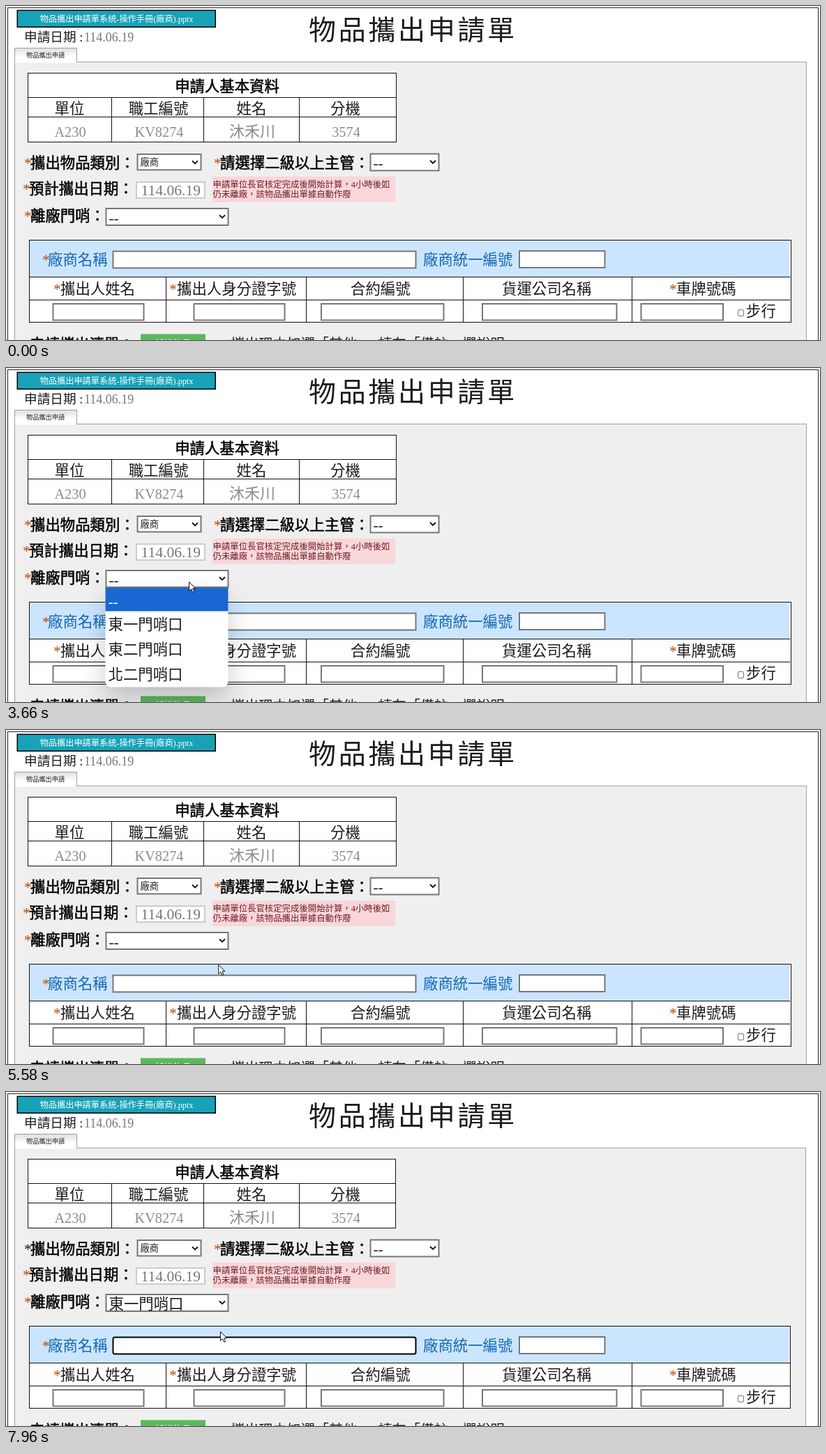
An HTML page that plays this animation: 1167 by 480 pixels, repeating every 8000 ms.

```html
<!DOCTYPE html>
<html lang="zh-Hant">
<head>
<meta charset="utf-8">
<style>
html, body { margin: 0; width: 100%; height: 100%; overflow: hidden; background: #fff; }
svg { display: block; width: 1167px; height: 480px; }
text { font-family: "Liberation Serif", "Noto Sans CJK TC", "Noto Sans CJK", serif; font-weight: 300; fill: #1c1c1c; white-space: pre; }
.regular { font-weight: 400; }
.bold { font-weight: 500; fill: #000; stroke: #000; stroke-width: .5px; }
.title { font-weight: 300; letter-spacing: 3.7px; }
.popup { filter: drop-shadow(0 18px 18px rgba(0, 0, 0, .2)); }
</style>
</head>
<body>
<svg id="stage" viewBox="0 0 1167 480">
  <defs>
    <linearGradient id="tab" x2="0" y2="1"><stop stop-color="#dedede"/><stop offset=".6" stop-color="#fff"/></linearGradient>
  </defs>
</svg>
<script>
const stage = document.getElementById('stage');
const LOOP = 8000, EM = 21.4, FIRST_ROW = 33.5, ROW = 36;

function add(tag, attrs, parent = stage) {
  const el = document.createElementNS('http://www.w3.org/2000/svg', tag);
  for (const key in attrs) el.setAttribute(key, attrs[key]);
  return parent.appendChild(el);
}

// y is the optical middle of the line
function text(x, y, content, size = EM, { fill, ...attrs } = {}, parent = stage) {
  const el = add('text', { x, y: y + size * .37, 'font-size': size, ...attrs }, parent);
  if (fill) el.style.fill = fill;
  el.textContent = content;
  return el;
}

const BOLD = { class: 'bold' };
const REGULAR = { class: 'regular' };
const MIDDLE = { 'text-anchor': 'middle' };

const rect = (x, y, width, height, fill, attrs) => add('rect', { x, y, width, height, fill, ...attrs });
const line = d => add('path', { d, stroke: '#111', fill: 'none' });
const star = (x, y) => text(x, y, '*', EM, { ...REGULAR, fill: '#b84600' });
const field = (x, y, w, h, stroke = '#767676') =>
  rect(x + 1, y + 1, w - 2, h - 2, '#fff', { stroke, 'stroke-width': 2 });

function label(x, y, content) {
  text(x + 9, y, content, EM, BOLD);
  return star(x, y);
}

function select(x, y, w, h, content, size) {
  const box = field(x, y, w, h);
  add('path', { d: `M${x + w - 13.5} ${y + 10.5}l4 4 4-4`, stroke: '#111', 'stroke-width': 1.8, fill: 'none' });
  return { box, value: text(x + 5, y + h / 2 + (size ? 0 : 1), content, size, REGULAR) };
}

// Page frame, header and tab
const frame = rect(2.5, 2.5, 1162, 500, '#fff', { stroke: '#222' });
const panel = rect(12.5, 80.5, 1135, 420, '#efefef', { stroke: '#a0a0a0' });
rect(16.25, 6.25, 284, 24, '#17a2b8', { stroke: '#000', 'stroke-width': 1.5 });
text(158.5, 18, '物品攜出申請單系統-操作手冊(廠商).pptx', 12.2, { style: 'font-weight:500', ...MIDDLE, fill: '#fff' });
text(26, 44, '申請日期 :', 18.67);
text(112, 44.5, '114.06.19', 18, { fill: '#777' });
text(434, 34, '物品攜出申請單', 39, { class: 'title' });
add('path', { d: 'M12.5 81.5V60.5H101.5V81.5', fill: 'url(#tab)', stroke: '#a0a0a0' });
text(29, 70.5, '物品攜出申請', 9.2, REGULAR);

// Applicant table
const applicant = rect(31.5, 96.5, 528, 99, '#fff', { stroke: '#111' });
line('M31 131.5H559M31 159.5H559M151.5 131V196M283.5 131V196M420.5 131V196');
text(317, 115, '申請人基本資料', EM, { ...BOLD, ...MIDDLE });
[[91, '單位', 'A230'], [218.5, '職工編號', 'KV8274'], [352, '姓名', '沐禾川'], [486.5, '分機', '3574']]
  .forEach(([x, head, value], i) => {
    text(x, 147, head, EM, MIDDLE);
    text(x + 1, 180, value, i === 2 ? 22 : 20.3, { ...MIDDLE, fill: '#8c8c8c' });
  });

// Form rows
const firstStar = label(26, 225, '攜出物品類別：');
select(187.5, 212, 93, 24.5, '廠商', 13.3);
label(298, 225, '請選擇二級以上主管：');
const manager = select(521.5, 211.5, 100, 26, '--');
label(24, 262.5, '預計攜出日期：');
field(186, 252, 100, 25, '#ccc');
text(193.5, 264.5, '114.06.19', 21.6, { fill: '#777' });
rect(296, 245, 262, 37, '#f8d7da');
text(296.5, 256.5, '申請單位長官核定完成後開始計算，4小時後如', 12.4, { fill: '#721c24' });
text(296.5, 270, '仍未離廠，該物品攜出單據自動作廢', 12.4, { fill: '#721c24' });
label(26, 301.5, '離廠門哨：');
const gate = select(142.5, 290, 177, 26, '--');

// Vendor table
const vendor = rect(33.5, 336.5, 1092, 118, '#fff', { stroke: '#111' });
rect(34, 337, 1089, 52, '#cce5ff');
line('M33 389.5H1124M33 422.5H1124M229.5 389V455M430.5 389V455M655.5 389V455M897.5 389V455');
star(52, 364);
text(60, 364, '廠商名稱', EM, { fill: '#1269b3' });
text(598, 364, '廠商統一編號', EM, { fill: '#1269b3' });
const vendorName = field(152.5, 351.5, 436, 26);
field(735, 351, 124.5, 26);
[68, 234, 951].forEach(x => star(x, 406));
[[78, '攜出人姓名'], [245, '攜出人身分證字號'], [494, '合約編號'], [711, '貨運公司名稱'], [961, '車牌號碼']]
  .forEach(([x, head]) => text(x, 406, head));
[[66.5, 132], [268.5, 132], [451, 177.5], [682, 194.5], [909.5, 119.5]].forEach(([x, w]) => field(x, 427, w, 25.5));
rect(1049.5, 436.5, 8, 9, '#fff', { stroke: '#777', rx: 1.5 });
text(1061, 438, '步行');

// Cut-off bottom row
text(34, 486.5, '申請攜出清單：', EM, BOLD);
rect(193, 471.5, 93, 20, '#5cb85c');
text(239.5, 485.5, '新增物品', 13.3, { ...MIDDLE, fill: '#fff' });
text(322, 486, '攜出理由如選「其他」，請在「備註」欄說明', 20.15);

// Drop-down lists
function popup(x, y, w, options) {
  const group = add('g', { class: 'popup' });
  const height = FIRST_ROW + ROW * (options.length - 1);
  add('path', {
    d: `M${x} ${y}h${w}v${height - 8}q0 9-9 9h${18 - w}q-9 0-9-9z`, fill: '#fff'
  }, group);
  const rowTop = i => y + (i && FIRST_ROW + ROW * (i - 1));
  const bar = add('rect', { x, width: w, height: ROW, fill: '#1967d2' }, group);
  const labels = options.map((option, i) => text(x + 4, rowTop(i) + 19, option, EM, {}, group));
  return (open, cursorY) => {
    group.style.display = open ? '' : 'none';
    const active = Math.max(0, Math.min(options.length - 1, Math.floor((cursorY - y - FIRST_ROW) / ROW) + 1));
    bar.setAttribute('y', rowTop(active));
    bar.setAttribute('height', active ? ROW : FIRST_ROW);
    labels.forEach((el, i) => { el.style.fill = i === active ? '#fff' : i ? '#1c1c1c' : '#0a2f6b'; });
  };
}
const managerList = popup(522, 237, 99, ['--', '甲主管', '乙主管']);
const gateList = popup(142.5, 316, 176, ['--', '東一門哨口', '東二門哨口', '北二門哨口']);

const caret = rect(370, 353, 1, 22, '#000');
const arrow = add('path', {
  d: 'M.5.5V13.5L3.6 10.7 5.7 15.4 7.8 14.5 5.7 9.8H9.8Z', fill: '#fff', stroke: '#111', 'stroke-linejoin': 'round'
});
const beam = add('path', { d: 'M-3-8q3 0 3 2v12q0 2-3 2M3-8q-3 0-3 2v12q0 2 3 2', fill: 'none', stroke: '#111' });

// Pointer path: time, x, y
const path = [
  [390, 201, 0], [640, 420, 60], [900, 628, 140], [1140, 590, 182], [1400, 543, 221], [1690, 543, 221],
  [1840, 545, 219], [1910, 551, 214], [2400, 551, 214], [2700, 390, 258], [2970, 283, 288], [3180, 267, 296],
  [3400, 262, 307], [4060, 262, 307], [4300, 244, 360], [4540, 237, 396], [4680, 241, 430], [4880, 252, 398],
  [5040, 259, 376], [5440, 259, 376], [5780, 368, 282], [6120, 285, 363], [6620, 285, 363], [7100, 298, 355],
  [7430, 307, 344], [LOOP, 307, 344]
];

function pointerAt(t) {
  const i = Math.max(1, path.findIndex(p => p[0] > t));
  const [t0, x0, y0] = path[i - 1], [t1, x1, y1] = path[i];
  const k = Math.max(0, (t - t0) / (t1 - t0));
  return [x0 + (x1 - x0) * k, y0 + (y1 - y0) * k];
}

function setFocus(box, on) {
  box.setAttribute('stroke', on ? '#000' : '#767676');
  box.setAttribute('rx', on ? 2.5 : 0);
}

function draw() {
  const t = performance.now() % LOOP;
  const within = (from, to) => t >= from && t < to;
  const show = (el, on) => { el.style.display = on ? '' : 'none'; };
  const [x, y] = pointerAt(t);
  const reloaded = t >= 5640;

  // The reloaded page is one pixel narrower
  [[panel, 1135], [applicant, 528], [vendor, 1092]]
    .forEach(([el, w]) => el.setAttribute('width', w - reloaded));
  firstStar.style.fill = reloaded ? '#111' : '#b84600';
  gate.value.textContent = reloaded ? '東一門哨口' : '--';

  setFocus(manager.box, within(1550, 3400));
  setFocus(vendorName, t >= 6340);
  managerList(within(1550, 2440), y);
  gateList(within(3460, 5170), y);
  show(caret, t >= 6370 && Math.floor((t - 6370) / 530) % 2 === 0);

  const overInput = t > 5640 && y > 351.5;
  show(arrow, t >= 390 && !overInput);
  show(beam, overInput);
  for (const el of [arrow, beam]) el.setAttribute('transform', `translate(${x.toFixed(1)} ${y.toFixed(1)})`);
  requestAnimationFrame(draw);
}
draw();
</script>
</body>
</html>
```
